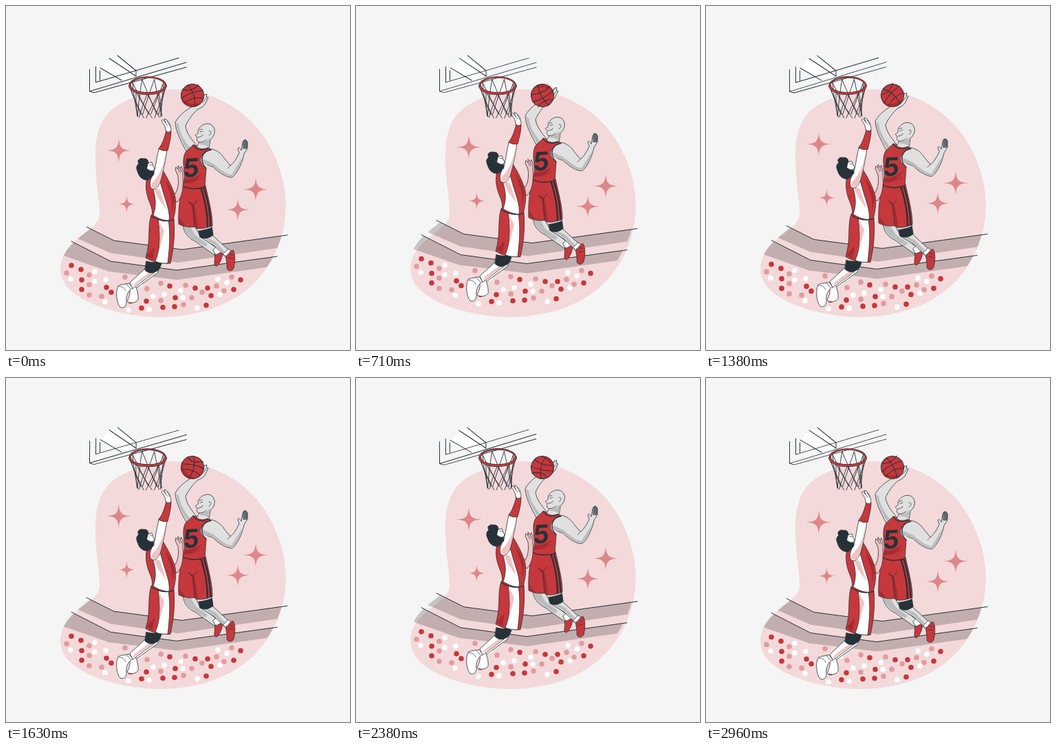
An HTML page that plays this animation: 500x500 px, repeating every 3 s.

```html
<!DOCTYPE html>
<html lang="en">
<head>
<meta charset="utf-8">
<title>Basketball dunk</title>
<style>
html, body { margin: 0; width: 100%; height: 100%; overflow: hidden; background: #f5f5f5; }
svg { display: block; width: 100%; height: 100%; }
.ink { fill: none; stroke: #263238; stroke-width: 1; stroke-linejoin: round; stroke-linecap: round; }
.body path { stroke: #263238; stroke-width: .8; stroke-linejoin: round; stroke-linecap: round; }
.body .flat { stroke: none; }
.body .thin { fill: none; stroke-width: .7; }
.red { fill: #c6383c; }
.deep { fill: #a52c31; }
.white { fill: #fff; }
.rose { fill: #f0c3c4; }
.skin { fill: #e0e0e0; }
.shade { fill: #bcbcbc; }
.dark { fill: #263238; }
</style>
</head>
<body>
<svg viewBox="0 0 500 500">
  <defs>
    <path id="blob" d="M243 121C300 121 356 152 384 205C402 240 409 270 406 305C402 350 378 395 338 421C300 446 255 453 215 452C165 450 108 433 87 406C73 385 78 362 100 342C120 324 136 318 136 301C136 280 131 262 130 225C129 180 140 155 170 140C195 127 220 121 243 121Z"/>
    <clipPath id="inside"><use href="#blob"/></clipPath>
  </defs>
  <use href="#blob" fill="#f3d9da"/>

  <g class="bob">
    <g clip-path="url(#inside)" fill-opacity=".2">
      <path d="M90 307L157 341L256 354L420 331V348L250 373L152 359L90 332Z"/>
      <path d="M70 329L152 371L248 384L420 360V374L249 398L150 386L70 358Z"/>
    </g>
    <path class="ink" d="M117 321L157 341L256 354L409 333M95 342L152 371L248 384L394 364"/>
    <g id="crowd"></g>
  </g>

  <g id="stars" fill="#dd8789"></g>

  <g id="hoop" class="ink">
    <path class="white" stroke="none" d="M137 91L150 77L162 73L189 94V103L168 108Z"/>
    <path d="M121.500 92V124L128 126L262 89M121.500 124L262 82M130.500 88V111L251 75.500M136.500 94V108M137 90L168 108M150 76L189 102V94L162 72"/>
    <g id="net" stroke-width=".9"></g>
    <ellipse cx="206" cy="115.500" rx="26" ry="12" stroke-width="2.600"/>
    <ellipse cx="206" cy="115.500" rx="26" ry="12" stroke="#c6383c" stroke-width="1.400"/>
    <path d="M180 116C182 131 230 131 232 116" stroke-width="4"/>
    <path d="M180 116C182 131 230 131 232 116" stroke="#c6383c" stroke-width="2.600"/>
  </g>

  <g class="bob body">
    <!-- raised arm -->
    <path class="skin" d="M262 211C254 197 246 180 246 169C252 158 262 151 273 145C274 138 282 138 284 134L288 129L292 128L291 132L294 133L291 139C289 145 284 148 279 150C272 156 265 165 261 174C262 184 269 193 278 204Z"/>
    <path class="shade flat" d="M247 170C248 182 256 197 263 209L267 205C258 195 252 181 251 172Z"/>
    <path class="thin" d="M285 141L291 134M283 138L288 130"/>
    <!-- far leg -->
    <path class="skin" d="M257 317C258 329 264 337 275 342L303 362L311 356L291 340L279 320Z"/>
    <path class="shade flat" d="M258 319C260 330 267 337 277 342L290 350L293 346L276 334L268 321Z"/>
    <path class="white" d="M301 354L307 349L314 357L306 364Z"/>
    <path class="red" d="M304 361C308 362 310 358 314 358C315 364 313 369 310 374C307 380 302 379 303 373Z"/>
    <!-- near leg -->
    <path class="skin" d="M275 320L299 318L301 334L326 357L319 364L302 348L284 337Z"/>
    <path class="shade flat" d="M284 335L303 347L318 362L321 360L304 342L291 336Z"/>
    <path class="dark" d="M280 327C286 326 292 325 299 322L301 333C295 338 288 339 282 336Z"/>
    <path class="white" d="M316 360L323 353L328 357L320 366Z"/>
    <path class="red" d="M320 363C323 363 325 355 330 355C334 360 333 373 331 381C329 386 322 386 321 381C322 374 319 369 320 363Z"/>
    <path class="thin" d="M325 361L330 362M324 366L330 367"/>
    <!-- shorts -->
    <path class="red" d="M257 261C252 278 250 300 251 317C258 321 267 322 274 321L276 323C284 325 294 322 300 319C300 300 294 280 290 261Z"/>
    <path class="deep flat" d="M273 288L264 283L270 291L274 320L279 323C278 310 276 299 273 288ZM252 308L262 321L252 317Z"/>
    <path class="thin" d="M265 285L272 290L274 321M273 289L278 282"/>
    <path fill="none" style="stroke-width:2.300" d="M283 263C289 281 293 300 293 321M287 262C293 280 297 300 297.500 320"/>
    <!-- head and neck -->
    <path class="skin" d="M279 182C281 172 295 167 301 175C306 182 302 190 297 194L295 208C288 211 280 209 277 205L281 198C277 198 277 193 278 191L275 188L279 185Z"/>
    <path class="shade flat" d="M282 198C288 198 293 195 296 192L295 206C291 201 286 202 282 201Z"/>
    <path class="thin" d="M281 180L285 179M282 183L286 182M279 191L285 189L286 187M295 182C299 180 299 187 295 188M281 198C286 198 289 196 291 194"/>
    <!-- lowered arm -->
    <path class="skin" d="M286 209C298 204 311 211 317 221L326 232C332 228 337 218 339 213L337 208C337 204 341 207 342 210L344 198L346 195L349 195L351 198L351 207L346 215C343 229 337 242 329 249C321 250 309 242 301 234C296 232 289 231 285 224Z"/>
    <path class="shade flat" d="M286 222L301 229C311 237 320 245 328 245L344 219C340 234 335 243 328 248C319 248 309 240 300 233L287 229Z"/>
    <path d="M345 199L346 195L349 195L351 199L350 207L345 207Z" fill="#7f898e"/>
    <path class="thin" d="M347 196V205M349 197L349 205M326 232L322 236"/>
    <!-- jersey -->
    <path class="red" d="M272 202L262 211C256 219 258 231 259 241C260 251 258 257 257 262C268 267 280 266 289 263L291 236C283 231 280 223 285 217C288 212 293 210 298 209L293 206C286 209 279 208 276 203Z"/>
    <path class="deep flat" d="M259 251C269 253 278 247 288 242L276 252L288 249L270 257L258 258Z"/>
    <path fill="none" style="stroke-width:1.300" d="M272 202C276 209 285 211 294 207M298 209C286 211 279 224 291 236M257 262C268 267 280 266 289 263"/>
    <text class="dark" transform="translate(257 249) rotate(-3) skewX(-7)" font-family="Inter, Roboto, sans-serif" font-weight="700" font-size="37">5</text>
  </g>

  <g id="ball" class="ink" stroke-width="1.200">
    <circle class="red" cx="271" cy="130" r="16.500"/>
    <path class="deep" stroke="none" d="M255 128C256 139 267 145 283 141C276 148 260 148 256 138Z"/>
    <path d="M255 134Q270 124 286.500 123M264 115Q276 128 275 146M257 121Q268 126 280 114.500M259 141Q272 131 287 134"/>
  </g>

  <g class="bob body">
    <!-- far arm -->
    <path class="rose" d="M241 270L246 273C251 264 251 255 250 247L246 238L247 234L250 237L250 232L253 236L255 233L257 239L257 248C258 262 257 276 249 285L242 281Z"/>
    <path class="thin" d="M250 237L253 242M253 236L255 241"/>
    <!-- far leg -->
    <path class="white" d="M211 374L185 402L188 411L220 388L227 372Z"/>
    <path class="white" d="M180 408L186 403C190 409 193 420 192 427C188 433 178 432 176 429C180 422 181 415 180 408Z"/>
    <!-- near leg -->
    <path class="white" d="M204 380L180 402L184 411L215 388Z"/>
    <path class="rose flat" d="M211 385L187 403L184 409L214 388Z"/>
    <path class="dark" d="M204 371C212 373 219 374 226 370C226 377 223 384 218 386C213 389 207 389 202 384Z"/>
    <path class="white" d="M168 405L179 403L184 410C177 414 174 422 175 431C175 437 170 440 166 438C160 431 159 414 163 407Z"/>
    <path class="thin" d="M175 404L181 411M164 408C168 407 173 410 174 414"/>
    <!-- shorts -->
    <path class="red" d="M211 304C205 322 211 340 203 366C213 372 226 375 239 374C243 355 246 335 244 309Z"/>
    <path class="white" d="M221 309C224 330 225 353 217 371C223 374 229 374 235 374C238 350 239 330 236 311Z"/>
    <path class="rose flat" d="M222 312L230 327L222 360C225 342 224 326 222 312Z"/>
    <path class="deep flat" d="M204 363L216 350L213 369Z"/>
    <!-- jersey -->
    <path class="red" d="M206 248C202 257 203 269 207 281C211 291 214 298 212 306C222 312 233 314 243 311C247 296 248 284 245 274C241 261 234 249 228 239Z"/>
    <path class="white" d="M211 256C215 272 221 285 214 304C221 309 230 312 237 312C239 299 232 284 227 266L224 255Z"/>
    <path class="rose flat" d="M214 264L224 267L233 296L221 279Z"/>
    <path class="deep flat" d="M232 253C236 269 244 279 241 301L245 283C244 271 238 260 232 253Z"/>
    <path fill="none" style="stroke-width:1.200" d="M212 306C222 312 233 314 243 311"/>
    <!-- reaching arm -->
    <path class="white" d="M222 208L234 209C232 223 229 239 225 253C222 265 214 270 210 263C208 256 211 250 215 243C218 231 219 220 222 208Z"/>
    <path class="rose flat" d="M231 216C229 232 224 246 211 259C211 266 218 267 222 260C227 246 231 228 231 216Z"/>
    <path class="white" d="M233 185L231 175L226 167L228 165L232 170L230 164L233 165L238 171L240 179L239 185Z"/>
    <path class="thin" d="M232 170L235 174M234 167L238 174"/>
    <path class="red" d="M233 182C235 184 238 183 240 182C240 192 237 202 235 210C230 211 225 210 222 207C228 200 230 191 233 182Z"/>
    <!-- head -->
    <path class="white" d="M205 229L212 227L214 233L216 236L214 240L214 246L205 250Z"/>
    <path class="dark" d="M191 240C188 234 191 231 193 229C189 224 196 220 200 222C205 221 207 225 207 228C205 231 206 233 204 236C207 238 209 240 214 240L215 245C211 246 211 252 205 253C198 253 193 248 191 240Z"/>
    <path class="thin" d="M209 231L212 231M211 240L214 239"/>
  </g>
</svg>
<script>
const $ = id => document.getElementById(id);

// x, y pairs of the spectators, by colour
const crowd = {
  '#c6383c': [95,377, 109,383, 110,398, 110,412, 146,409, 153,416, 181,429, 204,429, 197,439, 228,438, 238,407, 246,424, 245,437, 275,410, 293,410, 298,421, 331,412, 341,398, 291,435],
  '#e29b9d': [88,388, 121,391, 121,405, 121,420, 139,422, 173,394, 205,411, 225,403, 225,428, 261,406, 270,424, 258,434, 285,416, 306,407, 317,414, 328,394],
  '#fff': [94,397, 129,386, 129,400, 145,398, 144,430, 178,442, 195,405, 208,441, 214,422, 230,419, 254,414, 257,424, 278,439, 308,397, 321,402, 311,419]
};
for (const [color, spots] of Object.entries(crowd))
  for (let i = 0; i < spots.length; i += 2)
    $('crowd').innerHTML += `<circle cx="${spots[i]}" cy="${spots[i + 1]}" r="3.8" fill="${color}"/>`;

for (const [x, y, size] of [[164, 210, 18], [363, 266.5, 18], [337, 296, 16.500], [175.500, 288, 12.500]])
  $('stars').innerHTML += `<path transform="translate(${x} ${y}) scale(${size / 18})" d="M0-18C1-4 4-1 18 0C4 1 1 4 0 18C-1 4-4 1-18 0C-4-1-1-4 0-18Z"/>`;

// Net cords run both ways around a narrowing tube
let cords = '';
for (let i = 0; i < 9; i++)
  for (const turn of [-.95, .95]) {
    const a = i * Math.PI * 2 / 9 + .2, b = a + turn, m = a + turn / 2;
    const at = (angle, cx, cy, rx, ry) => `${(cx + rx * Math.cos(angle)).toFixed(1)} ${(cy + ry * Math.sin(angle)).toFixed(1)}`;
    cords += `M${at(a, 206, 117, 26, 11)}Q${at(m, 207, 142, 20, 6)} ${at(b, 208.500, 160, 18, 3)}`;
  }
$('net').innerHTML = `<path d="${cords}"/>`;

const rise = p => -10 * (1 - Math.abs(1 - 2 * p));
const sway = p => p < .25 ? 4 * p : p < .75 ? 2 - 4 * p : 4 * p - 4;
const set = (el, transform) => el.setAttribute('transform', transform);
const bobbing = document.querySelectorAll('.bob');

function draw() {
  const t = performance.now() % 3000, p = t % 1500 / 1500;
  bobbing.forEach(el => set(el, `translate(0 ${rise(p)})`));
  set($('stars'), `translate(0 ${rise(t / 3000)})`);
  set($('hoop'), `rotate(${sway(p)} 191 118)`);
  set($('ball'), `rotate(${360 * p} 271 130)`);
  requestAnimationFrame(draw);
}
draw();
</script>
</body>
</html>
```
